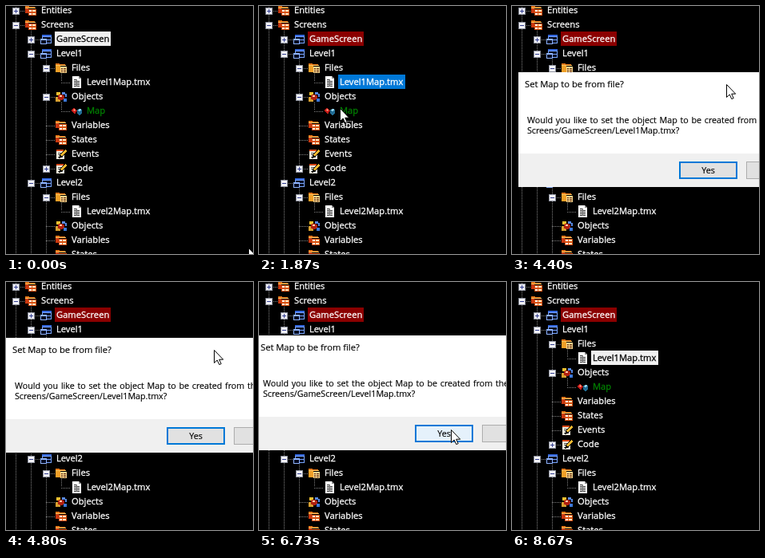
An HTML page that plays this animation: 309x311 px, repeating every 8.74 s.

```html
<!DOCTYPE html>
<html lang="en">
<head>
<meta charset="utf-8">
<title>Tree drag and drop</title>
<style>
html, body { margin: 0; width: 100%; height: 100%; overflow: hidden; background: #000; }
svg { display: block; width: 309px; height: 311px; }
text { font: 11.2px "Open Sans", "Noto Sans", sans-serif; fill: #fff; color: #fff; stroke: currentColor; stroke-width: .3px; white-space: pre; }
.dialog text { font-size: 10.7px; fill: #000; color: #000; stroke-width: .15px; word-spacing: 1px; }
.dialog .title { font-size: 11.2px; word-spacing: 0; }
.crisp { shape-rendering: crispEdges; }
</style>
</head>
<body>
<svg id="stage" viewBox="0 0 309 311"></svg>
<script>
const LOOP = 8740, STEP = 200 / 3;
const stage = document.getElementById('stage');

function add(parent, tag, attrs = {}, content) {
  const el = document.createElementNS('http://www.w3.org/2000/svg', tag);
  set(el, attrs);
  if (content) el.textContent = content;
  parent.append(el);
  return el;
}
function set(el, attrs) {
  for (const key in attrs) el.setAttribute(key, attrs[key]);
}
const rect = (parent, x, y, width, height, fill, more = {}) =>
  add(parent, 'rect', { x, y, width, height, fill, ...more });
const path = (parent, d, fill, more = {}) => add(parent, 'path', { d, fill, ...more });
const text = (parent, x, y, content, more = {}) => add(parent, 'text', { x, y, ...more }, content);
const show = (el, on) => set(el, { visibility: on ? 'visible' : 'hidden' });

// Icons are lists of [path, fill] on a 15 x 15 grid.
const icons = {
  folder: [
    ['M0 2h5v1h7v2H0z', '#e87818'], ['M0 5h4v6H0z', '#c83810'], ['M0 4h13v1H0z', '#ffc060'],
    ['M4 6h10v8H4z', '#d85010'], ['M5 7h3v2H5zM5 11h3v2H5z', '#fff'], ['M9 7h4v2H9zM9 11h4v2H9z', '#ffe8c0']
  ],
  files: [
    ['M0 2h5v1h7v2H0z', '#e87818'], ['M0 5h6v8H0z', '#f0a028'], ['M0 4h13v1H0z', '#ffc860'],
    ['M6 6h8v8H6z', '#f8d890'], ['M7 8h2v1H7zM7 10h2v1H7zM7 12h2v1H7zM10 8h3v1h-3zM10 10h3v1h-3zM10 12h3v1h-3z', '#602808']
  ],
  screen: [
    ['M2 2h12v11H2z', '#78a4ff'], ['M3 5h10v7H3z', '#000820'], ['M2 2h12v2H2z', '#3468e0'],
    ['M0 7h8v7H0z', '#90b4ff'], ['M1 9h6v4H1z', '#000820'], ['M8 8h6v1H8z', '#78a4ff']
  ],
  file: [
    ['M2 0h8l3 3v12H2z', '#fff'], ['M10 0v3h3z', '#888'],
    ['M4 4h3v1H4zM4 6h7v1H4zM4 8h7v1H4zM4 10h7v1H4zM4 12h7v1H4z', '#333'], ['M7 4h1v9H7z', '#777']
  ],
  objects: [
    ['M1 2h5v4H1z', '#f0c030'], ['M8 2h4v2h2v4h-2V5H8z', '#5888e0'], ['M0 8h3v3h3v3H0z', '#d8a030'],
    ['M4 5h5v1h2v5H9v1H5v-1H3V6h1z', '#b02010'], ['M5 6h3v2H5z', '#ffc8a8'], ['M10 10h4v4h-4z', '#3c78d8']
  ],
  map: [
    ['M1 6l3-2 4 3-3 5-4-4z', '#c81c18'], ['M3 6l2-1 1 2-2 1z', '#ff9078'],
    ['M8 6l3-1 3 1v5l-3 2-3-2z', '#206c94'], ['M8 6l3-1 3 1-3 2z', '#90d0e8']
  ],
  code: [
    ['M1 3h10v11H1z', '#f4f0e0'], ['M3 6h5v1H3zM3 8h4v1H3zM3 11h6v1H3z', '#555'],
    ['M11 2l3 2-6 8-4 1 1-4z', '#000'], ['M12 2l2 2-6 7-2-2z', '#f0b830'], ['M1 2h9v2H1z', '#d84818']
  ]
};

const rows = [
  [0, 'Entities', 'folder', '+'], [0, 'Screens', 'folder', '-'],
  [1, 'GameScreen', 'screen', '+'], [1, 'Level1', 'screen', '-'],
  [2, 'Files', 'files', '-'], [3, 'Level1Map.tmx', 'file'],
  [2, 'Objects', 'objects', '-'], [3, 'Map', 'map'],
  [2, 'Variables', 'folder'], [2, 'States', 'folder'],
  [2, 'Events', 'code'], [2, 'Code', 'code', '+'],
  [1, 'Level2', 'screen', '-'], [2, 'Files', 'files', '-'],
  [3, 'Level2Map.tmx', 'file'], [2, 'Objects', 'objects'],
  [2, 'Variables', 'folder'], [2, 'States', 'folder']
];

const tree = add(stage, 'g');
const dotted = d => path(tree, d, 'none', { stroke: '#808080', 'stroke-dasharray': '1 1', class: 'crisp' });
dotted('M12.5 1V311M31.5 31V311M50.5 67V203M50.5 229V311M69.5 85V95M69.5 121V131M69.5 247V257');

const labels = {};
rows.forEach(([depth, name, icon, sign], i) => {
  const y = 5 + 18 * i, x = 12 + 19 * depth;
  dotted(`M${x} ${y + 1.5}h11`);
  if (sign) {
    rect(tree, x - 3.5, y - 2.5, 8, 8, '#f2f2f6', { stroke: '#8c909c', class: 'crisp' });
    path(tree, `M${x - 2} ${y + 1}h5v1h-5z` + (sign === '+' ? `M${x} ${y - 1}h1v5h-1z` : ''), '#303c90', { class: 'crisp' });
  }
  const g = add(tree, 'g', { transform: `translate(${x + 12} ${y - 7})`, class: 'crisp' });
  icons[icon].forEach(([d, fill]) => path(g, d, fill));
  const back = rect(tree, x + 30, y - 9, name === 'GameScreen' ? 70 : 84, 18, 'none', { class: 'crisp' });
  const label = text(tree, x + 32, y + 4, name);
  labels[name] = { back, label };
});

function paint(name, back, color) {
  const { back: box, label } = labels[name];
  set(box, { fill: back });
  label.style.fill = label.style.color = color;
}
paint('Map', 'none', '#008000');

const dialog = add(stage, 'g', { class: 'dialog' });
rect(dialog, 0, 0, 368, 144, '#fff');
rect(dialog, 0, 102, 368, 42, '#f0f0f0');
text(dialog, 8, 19, 'Set Map to be from file?', { class: 'title' });
text(dialog, 11, 64, 'Would you like to set the object Map to be created from the file');
text(dialog, 11, 77, 'Screens/GameScreen/Level1Map.tmx?');
path(dialog, 'M341 10l9 9m0-9l-9 9', 'none', { stroke: '#000' });
const yes = rect(dialog, 202, 113, 71, 20, '#e1e1e1', { stroke: '#0078d7', 'stroke-width': 2 });
rect(dialog, 285.5, 112.5, 72, 21, '#e1e1e1', { stroke: '#adadad' });
text(dialog, 237.5, 127, 'Yes', { 'text-anchor': 'middle' });
text(dialog, 321.5, 127, 'No', { 'text-anchor': 'middle' });

const cursor = add(stage, 'g');
const dragBox = rect(cursor, 4.5, 16.5, 11, 7, 'none', { stroke: '#ddd', 'stroke-dasharray': '1 1', class: 'crisp' });
path(cursor, 'M.5 .5V16.5L4.2 13l2.6 5.6 2.4-1-2.5-5.4h5z', '#fff', { stroke: '#000' });

// Keys are [time, x, y].
const dialogKeys = [
  [4200, -230, 121], [4267, -120, 107], [4333, -40, 93], [4400, 8, 83],
  [4533, 12, 76], [4867, -3, 68], [5000, -3, 68], [5333, -6, 67]
];
const grab = [260, 15];
const cursorKeys = [
  [0, 303, 303], [400, 215, 165], [733, 142, 72], [933, 146, 95], [1400, 146, 95],
  [1867, 101, 128], [2333, 109, 134], [2467, 110, 136], [3267, 110, 136],
  [3333, 41, 148], [3400, -30, 148], [4133, -30, 148],
  ...dialogKeys.map(([t, x, y]) => [t, x + grab[0], y + grab[1]]),
  [5800, 254, 83], [5867, 238, 109], [6200, 235, 162], [6467, 238, 182], [6733, 240, 185],
  [7200, 241, 188], [7600, 241, 190], [7800, 185, 230], [8000, 80, 298], [8067, 50, 330]
];

function along(keys, t) {
  const i = keys.findIndex(key => key[0] > t);
  if (i < 0) return keys.at(-1).slice(1);
  if (i === 0) return keys[0].slice(1);
  const [a, b] = [keys[i - 1], keys[i]];
  const p = (t - a[0]) / (b[0] - a[0]);
  return [1, 2].map(k => Math.round(a[k] + (b[k] - a[k]) * p));
}

function render(now) {
  const t = Math.floor(((now % LOOP) + 5) / STEP) * STEP + 1;

  if (t < 1067) paint('GameScreen', '#f0f0f0', '#000');
  else paint('GameScreen', t < 1467 ? 'none' : '#8b0000', '#fff');

  const focused = (t > 1067 && t < 2733) || (t > 7200 && t < 8667);
  if (t < 1067) paint('Level1Map.tmx', 'none', '#fff');
  else if (focused) paint('Level1Map.tmx', '#0078d7', '#fff');
  else paint('Level1Map.tmx', '#f0f0f0', '#000');

  const fade = Math.min(1, Math.max(0, (t - 7230) / 170));
  const [dx, dy] = along(dialogKeys, t);
  show(dialog, t > 4200 && fade < 1);
  set(dialog, {
    opacity: (1 - fade) ** 1.25,
    transform: `translate(${dx + 184} ${dy + 72 - fade}) scale(${1 - fade * .05}) translate(-184 -72)`
  });

  const [x, y] = along(cursorKeys, t);
  set(cursor, { transform: `translate(${x} ${y})` });
  show(cursor, t < 8067);
  show(dragBox, t > 1467 && t < 2733);
  const hover = t > 5867 && y > 178;
  set(yes, { fill: t > 6800 && t < 7133 ? '#cce4f7' : hover ? '#e5f1fb' : '#e1e1e1' });
}

function frame() {
  render(performance.now());
  requestAnimationFrame(frame);
}
frame();
</script>
</body>
</html>
```
